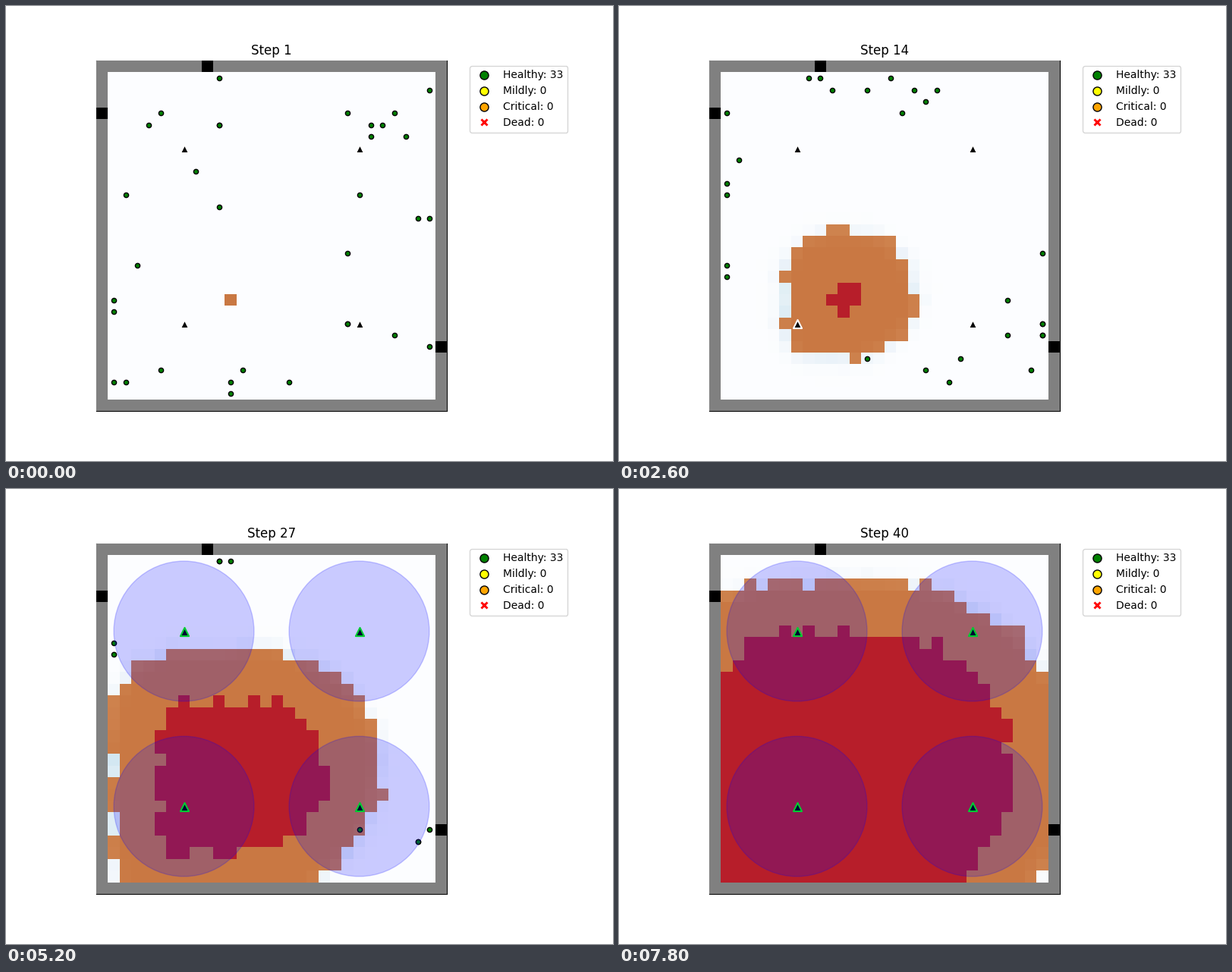
Recreate the animation shown at these times as a matplotlib script. Size 800 by 600 pixels, loop 8 s.

```python
import matplotlib.pyplot as plt
import numpy as np
from matplotlib.animation import FuncAnimation
from matplotlib.lines import Line2D
from matplotlib.patches import Circle

N = 30
STEPS = 40
PEOPLE = 33
BURN_TIME = 10
SPRINKLER_STEP = 15
FIRE = np.array([11, 20])
DOORS = np.array([(9, 0), (0, 4), (29, 24)])
SPRINKLERS = [(x, y) for x in (7, 22) for y in (7, 22)]

rng = np.random.default_rng(4)


# --- fire -----------------------------------------------------------------
def ignition_times():
    """Each side advances at its own pace; the power rounds each corner."""
    y, x = np.mgrid[:N, :N]
    dx, dy = x - FIRE[0], y - FIRE[1]
    tx = np.abs(dx) / np.where(dx < 0, 0.39, 0.49)
    ty = np.abs(dy) / np.where(dy < 0, 0.445, 0.385)
    power = np.where(dx < 0, np.where(dy < 0, 4, 6),
                     np.where(dy < 0, 2.5, 2))
    times = 1 + (tx**power + ty**power) ** (1 / power)
    times += rng.uniform(-1.2, 1.2, times.shape)
    times[FIRE[1], FIRE[0]] = 1
    return times


ignite = ignition_times()


# --- smoke and cell colours -----------------------------------------------
def diffuse(s):
    p = np.pad(s[1:-1, 1:-1], 1, mode="edge")
    near = (p[:-2, 1:-1] + p[2:, 1:-1] + p[1:-1, :-2] + p[1:-1, 2:]) / 4
    p[1:-1, 1:-1] += 0.8 * (near - p[1:-1, 1:-1])
    return p


def smoke_history():
    s = np.zeros((N, N))
    s[FIRE[1], FIRE[0]] = 1
    history = [s]
    for step in range(2, STEPS + 1):
        s = np.minimum(1, diffuse(s) + 0.3 * (ignite <= step))
        history.append(s)
    return history


SMOKE = smoke_history()
YOUNG, HOT = np.array([212, 141, 89]) / 255, np.array([201, 120, 67]) / 255
BURNT = np.array([183, 30, 42]) / 255


def cells(step):
    s = SMOKE[step - 1]
    rgb = 0.7 + 0.3 * plt.cm.Blues(s)[..., :3]
    burning = ignite <= step
    rgb[burning] = (YOUNG + (HOT - YOUNG) * s[..., None])[burning]
    rgb[ignite <= step - BURN_TIME] = BURNT
    rgb[[0, -1]] = rgb[:, [0, -1]] = 128 / 255
    for x, y in DOORS:
        rgb[y, x] = 0
    return rgb


# --- people ---------------------------------------------------------------
def distance(a, b):
    return np.abs(a - b).sum(axis=-1)


def starting_spots():
    """Random cells away from the fire and the open middle of the room."""
    spots = []
    while len(spots) < PEOPLE:
        p = rng.integers(1, N - 1, 2)
        in_middle = abs(p[0] - 16.5) < 4 and p[1] < 23
        if not in_middle and np.hypot(*(p - FIRE)) > 6:
            spots.append(p)
    return sorted(spots, key=lambda p: distance(DOORS, p).min())


def walk(start, leave):
    """One cell at a time, at a pace that reaches the door on time."""
    door = DOORS[distance(DOORS, start).argmin()]
    pos, path = start.copy(), []
    for step in range(1, int(np.ceil(leave))):
        path.append(pos.copy())
        gap = door - pos
        left = np.abs(gap).sum()
        if left and rng.random() < left / (leave - step):
            axis = int(rng.random() * left >= abs(gap[0]))
            pos[axis] += np.sign(gap[axis])
            pos = pos.clip(1, N - 2)
    return path


# How many people have left by which step
leave_times = np.interp(np.arange(PEOPLE) + 0.5,
                        [0, 2, 6, 14, 24, 30, 33],
                        [2, 9, 14, 19, 27, 32, 39])
paths = [walk(p, t) for p, t in zip(starting_spots(), leave_times)]


def positions(step):
    spots = [path[step - 1] for path in paths if step <= len(path)]
    return np.array(spots) if spots else np.empty((0, 2))


# --- figure ---------------------------------------------------------------
fig, ax = plt.subplots(figsize=(8, 6), dpi=100)
fig.subplots_adjust(right=0.75)
ax.set_xticks([])
ax.set_yticks([])

board = ax.imshow(cells(1), interpolation="nearest", zorder=2.6)
crowd = ax.scatter([], [], s=20, c="green", edgecolors="black",
                   linewidths=1, zorder=3)
heads = ax.scatter(*zip(*SPRINKLERS), s=64, marker="^", c="black",
                   edgecolors="white", linewidths=1.5, zorder=3.1)
sprays = [ax.add_patch(Circle(c, 6, color="blue", alpha=0.2, zorder=4))
          for c in SPRINKLERS]
title = ax.set_title("Step 1")


def key(label, color, marker="o", edge="black"):
    return Line2D([0], [0], marker=marker, color="w", label=label,
                  markerfacecolor=color, markeredgecolor=edge, markersize=8)


ax.legend(handles=[key(f"Healthy: {PEOPLE}", "green"),
                   key("Mildly: 0", "yellow"),
                   key("Critical: 0", "orange"),
                   key("Dead: 0", "red", "X", "w")],
          loc="upper left", bbox_to_anchor=(1.05, 1))


def update(frame):
    step = frame + 1
    wet = step >= SPRINKLER_STEP
    board.set_data(cells(step))
    crowd.set_offsets(positions(step))
    heads.set_edgecolor("lime" if wet else "white")
    for spray in sprays:
        spray.set_visible(wet)
    title.set_text(f"Step {step}")
    return [board, crowd, heads, title, *sprays]


anim = FuncAnimation(fig, update, frames=STEPS, interval=200,
                     repeat=True, repeat_delay=0)
plt.show()
```
